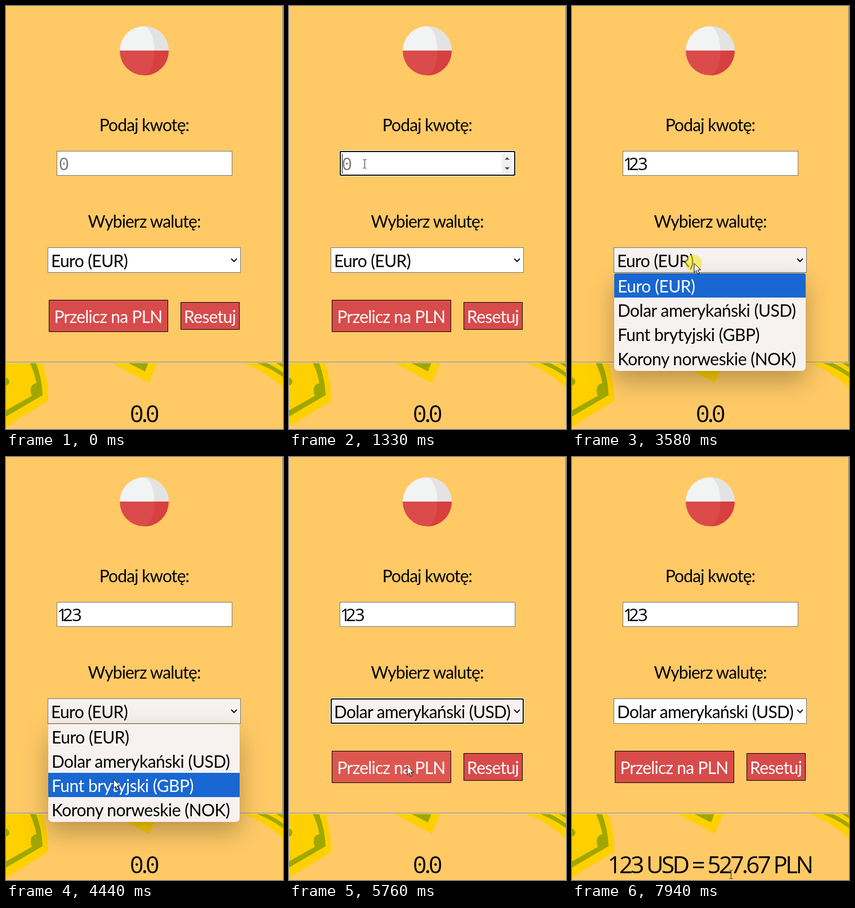
Animation of 492 by 750 pixels, one loop 8 s. Source, as an HTML page:

```html
<!DOCTYPE html>
<html lang="pl">
<head>
<meta charset="utf-8">
<title>Kalkulator walut</title>
<style>
  html, body { margin: 0; width: 100%; height: 100%; overflow: hidden; background: #ffc966; }
  svg { display: block; width: 492px; height: 750px; }
  text { font: 30px Lato, sans-serif; letter-spacing: -.9px; white-space: pre; }
  .mid { text-anchor: middle; }
  .num { font: 31px "Open Sans", sans-serif; letter-spacing: 0; }
  #result text { font: 42px "Open Sans", sans-serif; letter-spacing: -3.6px; }
  .btn { fill: #d84b4b; stroke: #000; }
  .btn.hover { fill: #dd5750; }
  .btn + text { fill: #fff; letter-spacing: -.75px; }
  .box { fill: #fff; stroke: #767676; }
  .box.tint { fill: #f7f2f0; }
  .ring rect { fill: none; }
  .panel { fill: #f7f2f0; filter: drop-shadow(0 18px 22px rgba(0, 0, 0, .27)); }
  #chosen { letter-spacing: -.65px; }
  #list text { letter-spacing: -.5px; }
</style>
</head>
<body>
<svg viewBox="0 0 492 750">
  <rect width="492" height="750" fill="#ffc966"/>

  <!-- banknotes -->
  <g fill="#ffd000">
    <path d="M0 632H64Q75 662 75 700L0 746Z"/>
    <path d="M186 632H269L254 668Z"/>
    <path d="M418 632Q460 646 492 677V632Z"/>
  </g>
  <g fill="#a0a800">
    <path d="M42 632H53Q64 660 65 690L0 728V717L46 691C42 682 43 670 54 669Q51 651 42 632Z"/>
    <circle cx="-1" cy="666" r="7"/>
    <path d="M215 632H253L247 648Z"/>
    <path d="M443 632H461Q479 640 492 650V658Q470 642 443 632Z"/>
    <path d="M477 632H492V641Q486 636 477 632Z"/>
  </g>

  <!-- card with a grooved edge -->
  <path d="M0 0H492V633H0Z" fill="#f0ebe0"/>
  <path d="M0 0H492V632H0Z" fill="#7d7a74"/>
  <path d="M0 0H491V631H0Z" fill="#ffc966"/>

  <!-- flag -->
  <clipPath id="disc"><circle cx="245.5" cy="79.5" r="43.5"/></clipPath>
  <g clip-path="url(#disc)">
    <path d="M200 30H292V79.500H200Z" fill="#f2f4f4"/>
    <path d="M245.500 36C257 39 263.500 58 263.500 79.500H292V30H245.500Z" fill="#e4e3e4"/>
    <path d="M200 79H292V126H200Z" fill="#db4b4b"/>
    <path d="M263.500 79C263.500 101 257 120 245.500 123V126H292V79Z" fill="#d84040"/>
  </g>

  <text class="mid" x="245.500" y="222">Podaj kwotę:</text>
  <text class="mid" x="245.500" y="393">Wybierz walutę:</text>

  <!-- amount -->
  <rect class="box" x="90.500" y="257.500" width="311" height="43"/>
  <g id="spin">
    <rect x="378" y="262" width="19" height="35" fill="#f0f0f0"/>
    <path d="M383 272.500L387.500 268L392 272.500ZM383 286L387.500 290.500L392 286Z" fill="#505050"/>
  </g>
  <g id="hint">
    <text class="num" x="94" y="291" fill="#757575">0</text>
    <circle cx="102.800" cy="279.500" r="1.700" fill="#757575"/>
  </g>
  <text id="amount" class="num" x="91 101 117" y="291"></text>
  <g id="ringIn" class="ring">
    <rect x="89.500" y="256.500" width="313" height="45" rx="3" stroke="#fff"/>
    <rect x="91" y="258" width="310" height="42" rx="2" stroke="#101010" stroke-width="2"/>
  </g>
  <rect id="caret" y="262" width="1" height="35"/>

  <!-- currency -->
  <rect id="select" class="box" x="74.500" y="428.500" width="342" height="44"/>
  <g id="ringSel" class="ring">
    <rect x="73.500" y="427.500" width="344" height="46" rx="3" stroke="#fff"/>
    <rect x="75" y="429" width="341" height="43" rx="2" stroke="#101010" stroke-width="2"/>
  </g>
  <text id="chosen" x="80" y="463"></text>
  <path d="M400 448L405 453L410 448" fill="none" stroke="#111" stroke-width="2"/>

  <rect id="convert" class="btn" x="76.500" y="521.500" width="211" height="56"/>
  <text class="mid" x="181.500" y="562">Przelicz na PLN</text>
  <rect id="reset" class="btn" x="310.500" y="525.500" width="104" height="48"/>
  <text class="mid" x="362" y="562">Resetuj</text>

  <g id="result">
    <text id="sum" class="mid" x="244.500" y="737.500"></text>
    <g id="dots"><circle cx="232.300" cy="722.500" r="2.300"/><circle cx="260.300" cy="722.500" r="2.300"/></g>
  </g>

  <g id="list">
    <clipPath id="panelClip"><path d="M75 477Q75 474 78 474H412Q415 474 415 477V639Q415 647 407 647H83Q75 647 75 639Z"/></clipPath>
    <path class="panel" d="M75 477Q75 474 78 474H412Q415 474 415 477V639Q415 647 407 647H83Q75 647 75 639Z"/>
    <g clip-path="url(#panelClip)"><rect id="row" x="75" width="340" height="43" fill="#1967d2"/></g>
  </g>

  <circle id="click" r="15" fill="#f0e628" fill-opacity=".62"/>
  <g id="pointer">
    <path id="arrow" d="M.5 .5V16.500L4.300 13L7 19L9.500 17.900L6.900 12H12Z" fill="#fff" stroke="#000"/>
    <path id="beam" d="M-3 -7.500H-1Q0 -7.500 0 -6.500V6.500Q0 7.500 -1 7.500H-3M3 -7.500H1Q0 -7.500 0 -6.500M0 6.500Q0 7.500 1 7.500H3" fill="none" stroke="#222"/>
  </g>
</svg>
<script>
const LOOP = 8000, STEP = 66.3, ROW = 43, LIST_TOP = 474;
const $ = id => document.getElementById(id);
const show = (id, on) => $(id).setAttribute('visibility', on ? 'visible' : 'hidden');
const between = (t, a, b) => t >= a && t < b;

const options = ['Euro (EUR)', 'Dolar amerykański (USD)', 'Funt brytyjski (GBP)', 'Korony norweskie (NOK)'];
const optionTexts = options.map((name, i) => {
  const el = document.createElementNS('http://www.w3.org/2000/svg', 'text');
  el.setAttribute('x', 81);
  el.setAttribute('y', 508 + i * ROW);
  el.textContent = name;
  return $('list').appendChild(el);
});

// pointer waypoints: time, x, y
const path = [
  [400, 421, 671], [1130, 134, 280],
  [2920, 134, 280], [3310, 216, 456],
  [4110, 216, 456], [4440, 190, 571], [4900, 196, 582],
  [4970, 196, 582], [5300, 209, 547],
  [6230, 209, 547], [6430, 181, 547],
  [7750, 181, 547], [7940, 282, 740]
];
const typed = [[1990, '1', 101], [2190, '12', 118], [2390, '123', 134]];
const clicks = [[1260, 1330], [3450, 3780], [5300, 5500], [6960, 7090]];

function pointerAt(t) {
  let i = path.length - 1;
  while (i > 0 && path[i][0] > t) i--;
  const [t0, x0, y0] = path[i];
  if (i === path.length - 1) return [x0, y0];
  const [t1, x1, y1] = path[i + 1];
  const p = Math.max(0, Math.floor((t - t0) / STEP + .02) * STEP / (t1 - t0));
  const e = p * p * (3 - 2 * p);
  return [Math.round(x0 + (x1 - x0) * e), Math.round(y0 + (y1 - y0) * e)];
}

function draw(t) {
  const [x, y] = pointerAt(t);
  const seen = t >= 400, open = between(t, 3450, 5760);
  const over = (l, top, r, b) => seen && !open && x >= l && x <= r && y >= top && y <= b;
  const focus = between(t, 1260, 3450);
  const overInput = over(90, 257, 402, 301);

  const entry = typed.filter(k => t >= k[0]).pop();
  $('amount').textContent = entry ? entry[1] : '';
  show('hint', !entry);
  show('spin', focus || overInput);
  show('ringIn', focus);
  $('caret').setAttribute('x', entry ? entry[2] : 94);
  show('caret', between(t, 1260, 1790) || between(t, 1990, 2920));

  $('select').classList.toggle('tint', between(t, 3310, 6960) || over(74, 428, 417, 473));
  show('ringSel', between(t, 5760, 6960));
  $('chosen').textContent = options[t < 5760 ? 0 : 1];
  $('convert').classList.toggle('hover', over(76, 521, 288, 578));
  $('reset').classList.toggle('hover', over(310, 525, 415, 574));

  const done = t >= 7090;
  $('sum').textContent = done ? '123 USD = 527.67 PLN' : '0.0';
  show('dots', !done);

  const row = Math.max(0, Math.floor((y - LIST_TOP) / ROW));
  show('list', open);
  $('row').setAttribute('y', LIST_TOP + row * ROW);
  optionTexts.forEach((el, i) => el.setAttribute('fill', i === row ? '#fff' : '#000'));

  const beam = overInput || over(146, 365, 345, 400) || over(65, 700, 424, 750);
  show('click', clicks.some(([a, b]) => between(t, a, b)));
  $('click').setAttribute('cx', x);
  $('click').setAttribute('cy', y);
  $('pointer').setAttribute('transform', `translate(${x + .5} ${y})`);
  show('arrow', seen && !beam);
  show('beam', seen && beam);
}

const start = performance.now();
(function tick() {
  draw((performance.now() - start) % LOOP);
  requestAnimationFrame(tick);
})();
</script>
</body>
</html>
```
